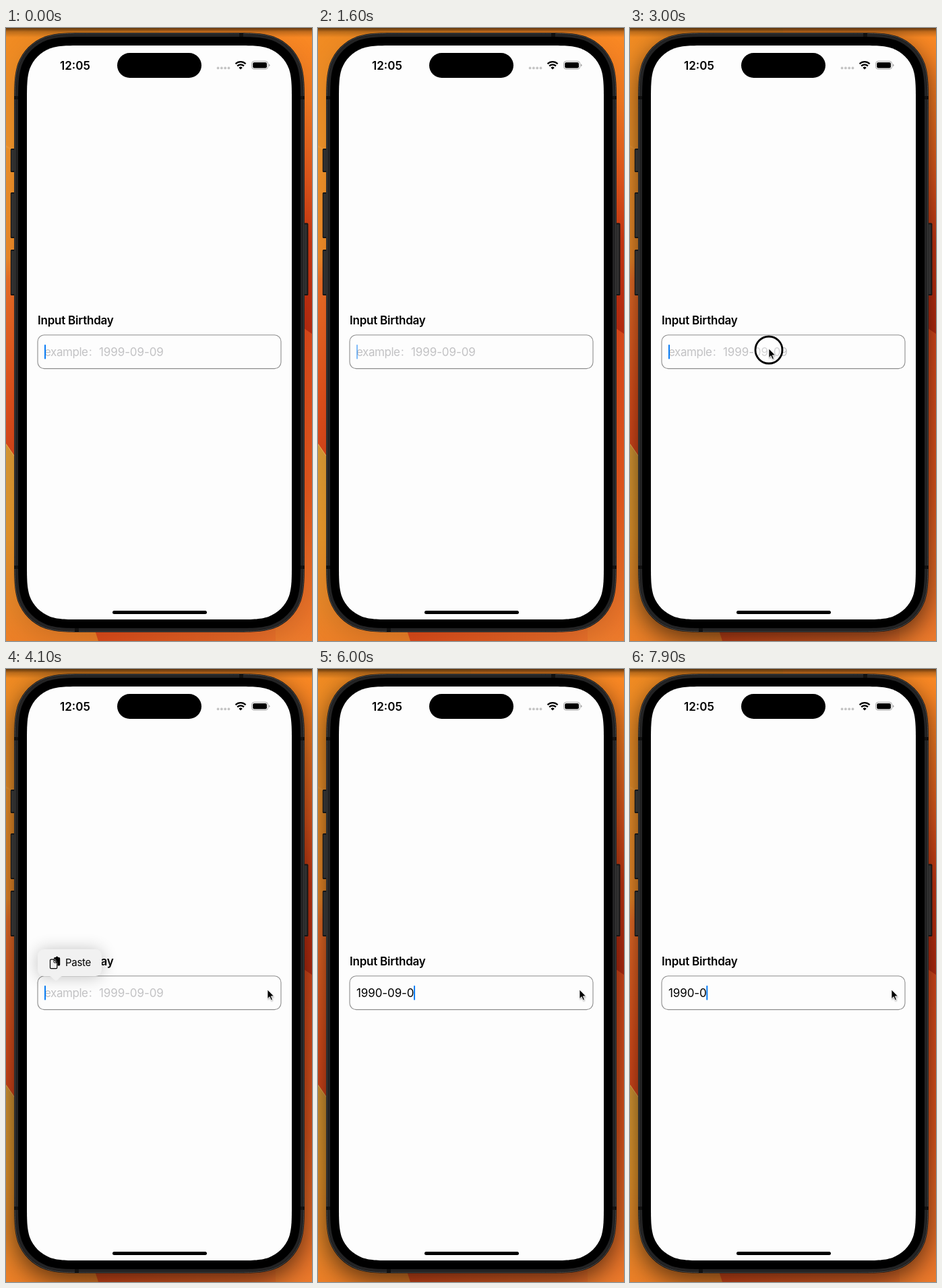
Animation, 454 px wide and 910 px high, one loop 8000 ms. Source, as an HTML page:

```html
<!DOCTYPE html>
<html lang="en">
<head>
<meta charset="utf-8">
<title>Birthday input</title>
<style>
  html, body { margin: 0; width: 100%; height: 100%; overflow: hidden; background: #e0742a; }
  svg { display: block; width: 454px; height: 910px; }
  text { font-family: Inter, "Noto Sans CJK SC", "Noto Sans CJK", sans-serif; font-size: 17px; white-space: pre; }
  .bold { font-weight: 600; }
</style>
</head>
<body>
<svg viewBox="0 0 454 910">
  <defs>
    <linearGradient id="left" x2="0" y2="1">
      <stop offset="0" stop-color="#f08a22"/>
      <stop offset=".19" stop-color="#f0932a"/>
      <stop offset=".375" stop-color="#ee8a28"/>
      <stop offset=".41" stop-color="#ec6f27"/>
      <stop offset=".6" stop-color="#e2521c"/>
      <stop offset=".7" stop-color="#d8461a"/>
    </linearGradient>
    <linearGradient id="leftLow" x2="0" y2="1">
      <stop offset="0" stop-color="#d99a35"/>
      <stop offset=".45" stop-color="#e6962b"/>
      <stop offset="1" stop-color="#ec7f27"/>
    </linearGradient>
    <linearGradient id="right" x2="0" y2="1">
      <stop offset="0" stop-color="#f98a24"/>
      <stop offset=".12" stop-color="#f47a22"/>
      <stop offset=".25" stop-color="#e2561c"/>
      <stop offset=".35" stop-color="#c93712"/>
      <stop offset=".49" stop-color="#b92c10"/>
    </linearGradient>
    <linearGradient id="rightLow" x2="0" y2="1">
      <stop offset=".18" stop-color="#dd4a1b"/>
      <stop offset=".6" stop-color="#e4581e"/>
      <stop offset="1" stop-color="#ec7a2c"/>
    </linearGradient>
    <linearGradient id="bottom">
      <stop offset="0" stop-color="#dc4a1a"/>
      <stop offset="1" stop-color="#e9702a"/>
    </linearGradient>
    <linearGradient id="topShade" x2="0" y2="1">
      <stop offset="0" stop-opacity=".6"/>
      <stop offset=".4" stop-opacity=".22"/>
      <stop offset="1" stop-opacity="0"/>
    </linearGradient>
    <filter id="soft" x="-30%" y="-30%" width="160%" height="160%"><feGaussianBlur stdDeviation="18"/></filter>
    <filter id="drop" x="-60%" y="-120%" width="220%" height="340%"><feGaussianBlur stdDeviation="12"/></filter>
    <filter id="tiny" x="-50%" y="-50%" width="200%" height="200%"><feGaussianBlur stdDeviation=".8"/></filter>
  </defs>

  <g id="wallpaper">
    <path fill="url(#left)" d="M0 0H227V910H0Z"/>
    <path fill="url(#right)" d="M227 0H454V910H227Z"/>
    <path fill="#f6a544" opacity=".45" d="M0 174L12 181V184L0 177Z"/>
    <path fill="url(#rightLow)" d="M300 349L454 454V910H300Z"/>
    <path fill="url(#leftLow)" d="M0 617L40 676V830H140V910H0Z"/>
    <path fill="none" stroke="#eeb45a" d="M0 617.5L14 638"/>
    <path fill="url(#bottom)" d="M129 885H400V910H137Z"/>
    <rect width="454" height="14" fill="url(#topShade)"/>
  </g>
  <path id="shadow" class="body" transform="translate(0 12)" filter="url(#soft)"/>

  <g id="buttons"></g>
  <path class="body" fill="#141414"/>
  <path id="edge" fill="none" stroke="#5c5c5c" stroke-width=".8"/>
  <path id="band" fill="#232324"/>
  <path id="bezel" fill="#000"/>
  <path fill="#111" d="M12 101h6v5h-6zM437 101h6v5h-6zM12 798h6v5h-6zM437 798h6v5h-6zM346 8h6v5h-6zM102 891h6v5h-6z"/>
  <path id="screen" fill="#fdfdfd"/>
  <rect x="165" y="37" width="125" height="37" rx="18.5"/>
  <rect x="158" y="865" width="140" height="5" rx="2.5"/>

  <text class="bold" x="80" y="61.5">12:05</text>
  <g id="dots" fill="#c4c4c4"></g>
  <g fill="none" stroke="#000" stroke-width="2.3">
    <path d="M340.6 53.3a10.6 10.6 0 0 1 15 0M343.2 56.4a7 7 0 0 1 9.8 0"/>
    <path d="M348.1 61.6l-2.7-2.7a3.9 3.9 0 0 1 5.4 0z" fill="#000" stroke="none"/>
  </g>
  <rect x="364.5" y="49.3" width="24.2" height="11.8" rx="3.7" fill="none" stroke="#a5a5a5"/>
  <rect x="366.2" y="51" width="20.8" height="8.4" rx="2.2"/>
  <path fill="#a0a0a0" d="M390 53.2q1.5.5 1.5 2t-1.5 2z"/>

  <text class="bold" x="47" y="439.8" letter-spacing="-.22">Input Birthday</text>
  <rect x="47" y="455.8" width="361" height="49.8" rx="9.5" fill="none" stroke="#8d8d8d" stroke-width="1.1"/>
  <g id="hint" fill="#c2c2c4">
    <text x="57" y="487" letter-spacing="-.45">example</text>
    <circle cx="125.3" cy="478.5" r="1.1"/>
    <circle cx="125.3" cy="485.5" r="1.1"/>
    <text x="138" y="487" letter-spacing="-.1">1999-09-09</text>
  </g>
  <text id="value" x="57" y="487" letter-spacing="-.1"></text>
  <rect id="caret" y="470" width="2" height="21.6" rx=".8" fill="#087cf5"/>

  <g id="menu">
    <rect x="47" y="417" width="95" height="40" rx="9" filter="url(#drop)" opacity=".24"/>
    <path fill="#f1f1f1" d="M56 416H133a9 9 0 0 1 9 9V447a9 9 0 0 1-9 9H84C80 456 77 462.5 74 462.5S68 456 64 456H56a9 9 0 0 1-9-9V425a9 9 0 0 1 9-9Z"/>
    <path d="M71 429.5q0-1.5 1.5-1.5H74q.3-1.6 1.6-1.6T77.2 428H78.5q1.7 0 1.7 1.7V439q0 1.6-1.6 1.6H76.5V436L72.5 430.5H71Z"/>
    <path fill="#f1f1f1" stroke="#000" stroke-width="1.2" stroke-linejoin="round" d="M66.8 431.2H71.2L75.8 436V443.2q0 1.4-1.4 1.4H66.8q-1.3 0-1.3-1.4V432.5q0-1.3 1.3-1.3Z"/>
    <path fill="none" stroke="#000" d="M71 431.5V435q0 1 1 1H75.5"/>
    <text x="88" y="441" style="font-size:15px" letter-spacing="-.3">Paste</text>
  </g>

  <circle id="ring" r="20" fill="#fdfdfd" fill-opacity=".3" stroke="#000" stroke-width="2.8"/>
  <g id="pointer">
    <path d="M0 0V14L3.2 11 5.5 16 7.600 15 5.500 10.200H9.600Z" transform="translate(.5 1.5)" filter="url(#tiny)" opacity=".35"/>
    <path d="M0 0V13.500L3.100 10.600 5.300 15.600 7.400 14.700 5.300 9.800H9.500Z" stroke="#fff" stroke-width=".8"/>
  </g>
</svg>

<script>
const LOOP = 8000;
const $ = id => document.getElementById(id);

// One continuous-curvature corner for radius 1, from the side to the top.
const CORNER = [[0, 1.529], [0, 1.088], [0, .868], [.075, .631], [.169, .373],
  [.373, .169], [.631, .075], [.868, 0], [1.088, 0], [1.529, 0]];

function squircle(x, y, w, h, r) {
  const corner = (right, low) => {
    const pts = CORNER.map(([u, v]) =>
      `${right ? x + w - u * r : x + u * r} ${low ? y + h - v * r : y + v * r}`);
    if (right !== low) pts.reverse();
    return pts[0] + 'C' + pts.slice(1).join(' ');
  };
  return 'M' + [corner(false, false), corner(true, false), corner(true, true), corner(false, true)].join('L') + 'Z';
}

const inset = (d, r) => squircle(12 + d, 7 + d, 431 - 2 * d, 890 - 2 * d, r);
document.querySelectorAll('.body').forEach(p => p.setAttribute('d', inset(0, 73)));
$('edge').setAttribute('d', inset(1.2, 72));
$('band').setAttribute('d', inset(2.2, 71));
$('bezel').setAttribute('d', inset(6, 68));
$('screen').setAttribute('d', squircle(31, 26, 393, 852, 55));

const button = (x, y, h) =>
  `<rect x="${x}" y="${y}" width="7" height="${h}" rx="1.5" fill="#161616"/>` +
  `<rect x="${x + 1.2}" y="${y + 2}" width="4" height="${h - 4}" fill="#303030"/>`;
$('buttons').innerHTML =
  button(6.8, 179, 35) + button(6.8, 244, 68) + button(6.8, 329, 68) + button(441.4, 289.5, 107.5);
$('dots').innerHTML = [0, 1, 2, 3].map(i => `<circle cx="${314.6 + i * 5.3}" cy="59.4" r="1.9"/>`).join('');

// [time, field content]
const KEYS = [
  [4600, '1'], [4800, '19'], [5000, '199'], [5200, '1990'],
  [5500, '1990-0'], [5700, '1990-09'], [6000, '1990-09-0'], [6200, '1990-09-09'],
  [7300, '1990-09-0'], [7500, '1990-09'], [7800, '1990-0']
];

// [time, x, y]
const PATH = [[2300, 470, 560], [2800, 206, 476], [3300, 206, 476], [3800, 388, 476]];

const clamp = v => Math.min(1, Math.max(0, v));
const ramp = (t, a, b) => clamp((t - a) / (b - a));
const ease = p => p * p * (3 - 2 * p);
const show = (id, alpha) => $(id).setAttribute('opacity', alpha);

function pointerAt(t) {
  let [, x, y] = PATH[0];
  for (let i = 1; i < PATH.length; i++) {
    const p = ease(ramp(t, PATH[i - 1][0], PATH[i][0]));
    x += (PATH[i][1] - x) * p;
    y += (PATH[i][2] - y) * p;
  }
  return [x, y];
}

// Solid after each key, then a one second blink.
function caretAlpha(since) {
  const p = (since + 1000) % 1000;
  return p < 800 ? 1 - ramp(p, 400, 620) : ramp(p, 800, 1000);
}

function draw(t) {
  const last = KEYS.filter(k => k[0] <= t).pop();
  const value = last ? last[1] : '';
  $('value').textContent = value;
  show('hint', value ? 0 : 1);
  $('caret').setAttribute('x', 57 + (value ? $('value').getComputedTextLength() - .4 : 0));
  show('caret', caretAlpha(t - (last ? last[0] : 700)));

  const [x, y] = pointerAt(t);
  $('pointer').setAttribute('transform', `translate(${x} ${y})`);
  $('ring').setAttribute('transform', `translate(${x} ${y + 2})`);
  show('pointer', t >= 2300 ? 1 : 0);
  show('ring', t >= 2900 && t < 3150 ? 1 : 0);
  show('shadow', t >= 2900 ? .6 : .12);
  show('menu', ramp(t, 3200, 3400) * (1 - ramp(t, 4400, 4600)));
}

function frame(now) {
  draw(now % LOOP);
  requestAnimationFrame(frame);
}
requestAnimationFrame(frame);
</script>
</body>
</html>
```
